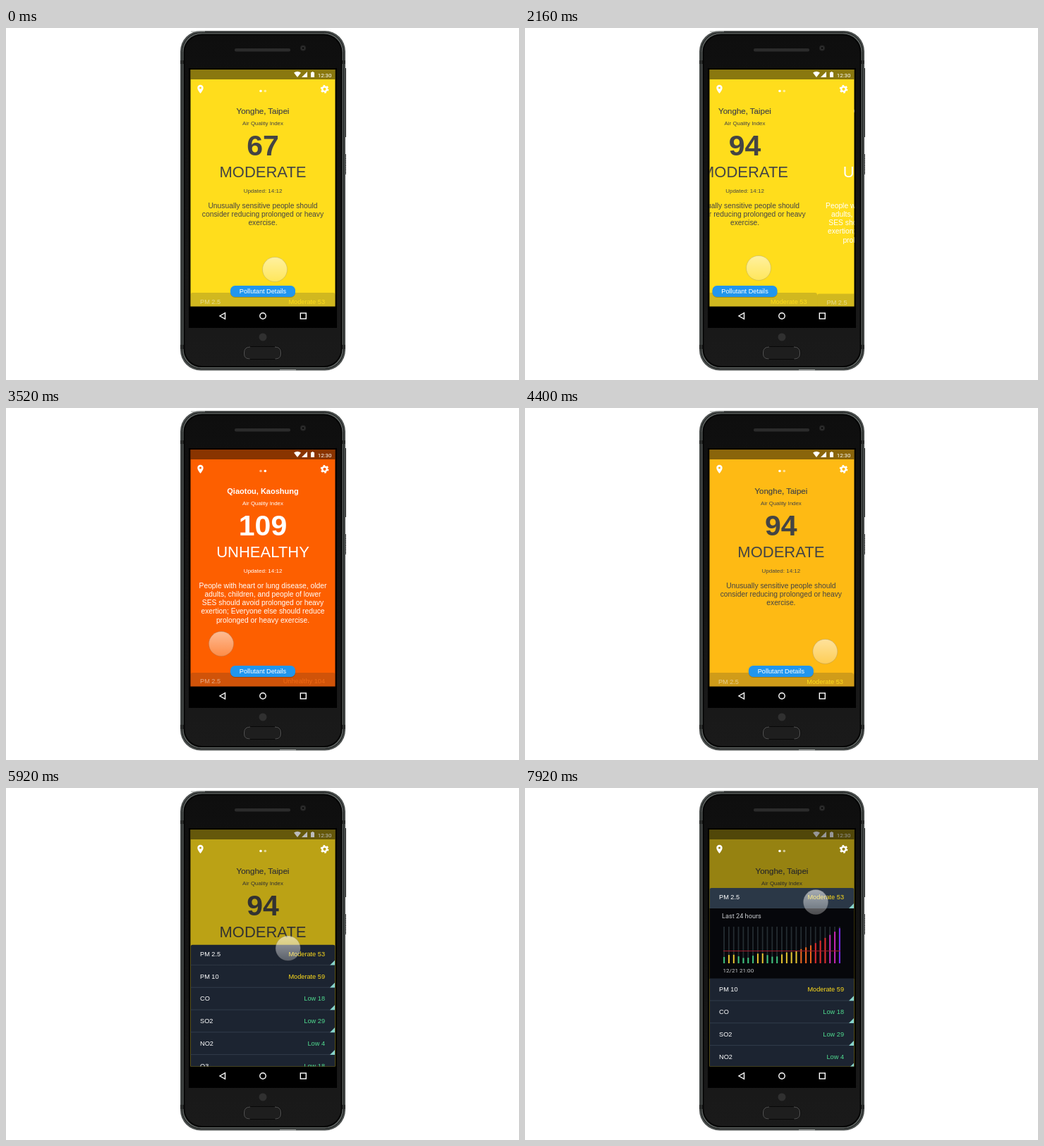
An HTML page for the animation above (8000 ms loop, 727 px wide and 500 px high).

```html
<!DOCTYPE html>
<html lang="en">
<head>
<meta charset="utf-8">
<title>Air quality</title>
<style>
html, body { margin: 0; width: 100%; height: 100%; overflow: hidden; background: #fff; }
svg { display: block; width: 100%; height: 100%; font-family: "Liberation Sans", Arial, sans-serif; }
.roboto { font-family: Roboto, sans-serif; }
.label { font-size: 9.2px; }
</style>
</head>
<body>
<svg viewBox="0 0 727 500">
  <defs>
    <clipPath id="screen"><rect x="261.5" y="59" width="205" height="336.500"/></clipPath>
    <linearGradient id="glass" x2="0" y2="1">
      <stop offset="0" stop-color="#fff" stop-opacity=".58"/>
      <stop offset="1" stop-color="#fff" stop-opacity=".28"/>
    </linearGradient>
    <linearGradient id="face" x2="0" y2="1">
      <stop offset="0" stop-color="#0e0e0e"/>
      <stop offset=".5" stop-color="#151515"/>
      <stop offset="1" stop-color="#1a1a1a"/>
    </linearGradient>
  </defs>

  <g id="phone">
    <path d="M480 57h2v98h-2zM480 179h1.600v29h-1.600z" fill="#333"/>
    <path d="M481.500 180v28" stroke="#111" stroke-dasharray="1 1.500"/>
    <rect x="247" y="4" width="234" height="482.500" rx="29" fill="#4b4f4e"/>
    <rect x="249.500" y="6.500" width="229" height="477.500" rx="27" fill="none" stroke="#161818"/>
    <rect x="251" y="8" width="226" height="474.500" rx="26" fill="none" stroke="#5f6462" stroke-width="1.500"/>
    <path d="M247 46h5v5h-5zM476 46h5v5h-5zM247 450h5v6h-5zM476 450h5v6h-5z" fill="#2a2c2b"/>
    <path d="M262 5h20M388 485.500h23" stroke="#a5a9a7"/>
    <rect x="252.500" y="9.500" width="223" height="471.500" rx="25" fill="url(#face)" stroke="#050505" stroke-width="2"/>
    <rect x="324" y="29" width="79" height="4.500" rx="2" fill="#2b2b2b"/>
    <circle cx="421" cy="28.500" r="4" fill="#252525"/>
    <circle cx="421" cy="28.500" r="2" fill="#0a0a0a" stroke="#444" stroke-width=".7"/>
    <rect x="259" y="57" width="210" height="369" fill="#000"/>
    <circle cx="364" cy="439" r="5.500" fill="#303030"/>
    <rect x="337" y="452.500" width="53.500" height="18" rx="8" fill="#1e1e1e" stroke="#080808"/>
    <path d="M346 453q-8.500 0-8.500 8v2q0 7 8 7M381 453q8.500 0 8.500 8v2q0 7-8 7" fill="none" stroke="#555"/>
    <g fill="none" stroke="#fff" stroke-width="1.400">
      <path d="M303 409l7.500-4.300v8.600z"/>
      <circle cx="364" cy="409" r="4.200"/>
      <rect x="417.300" y="405" width="8" height="8"/>
    </g>
  </g>

  <g clip-path="url(#screen)">
    <rect id="bg" x="261" y="59" width="206" height="337"/>
    <rect x="261" y="59" width="206" height="14" opacity=".46"/>
    <g fill="#fff">
      <path d="M408 63.500q5-3.500 10 0l-5 6.500zM419 70l8-8v8zM432 63h1.500v-1h2v1h1.500v7h-5z"/>
      <text class="roboto" x="441.700" y="69.500" font-size="8">12:30</text>
    </g>
    <g id="pages">
      <g id="pageA" fill="#444"></g>
      <g id="pageB" fill="#fff" transform="translate(205)"></g>
    </g>
    <rect id="dim" x="261" y="59" width="206" height="337"/>
    <g fill="#fff">
      <path fill-rule="evenodd" d="M275.500 93q-4.200-5-4.200-8a4.200 4.200 0 0 1 8.400 0q0 3-4.200 8zM275.500 86.500a1.500 1.500 0 1 0 0-3 1.500 1.500 0 0 0 0 3z"/>
      <g fill="none" stroke="#fff" transform="translate(451.500 86.800)">
        <circle r="3.300" stroke-width="2.400"/>
        <circle r="5" stroke-width="1.800" stroke-dasharray="2.618"/>
      </g>
      <circle id="dotA" cx="361" cy="89.500" r="1.800"/>
      <circle id="dotB" cx="367.300" cy="89.500" r="1.800"/>
    </g>
    <g id="panelLayer">
      <g id="panelB" transform="translate(205 376)">
        <rect x="261.500" width="205" height="30" rx="3" fill="#1c2431" opacity=".2"/>
        <text class="label" x="275" y="15.300" fill="#fff" opacity=".5">PM 2.5</text>
        <text class="label" x="452" y="15.300" text-anchor="end" fill="#f87018" opacity=".8">Unhealthy 104</text>
      </g>
      <g id="panelA">
        <path class="sheet" id="head" d="M261.500 29V3q0-3 3-3h199q3 0 3 3v26z"/>
        <g id="firstRow"></g>
        <g id="chart">
          <rect x="261" y="29" width="206" height="100" fill="#06070b"/>
          <g class="roboto" fill="#c9cbce">
            <text x="279" y="43.300" font-size="9.200">Last 24 hours</text>
            <text x="280.500" y="120" font-size="8.100">12/21 21:00</text>
          </g>
          <g id="bars"></g>
          <path d="M281 89.500h166" stroke="#a01c2c"/>
        </g>
        <g id="rest"><rect class="sheet" x="261.500" y="29" width="205" height="250" fill="#1c2431"/></g>
      </g>
      <g id="buttonB" transform="translate(569 374)"></g>
      <g id="buttonA"></g>
    </g>
  </g>
  <circle id="touch" r="17.500" fill="url(#glass)" stroke="#777" stroke-opacity=".35" stroke-width=".8"/>
</svg>

<script>
const LOOP = 8000, STEP = 80, PAGE = 205, PULL = 234, CHART = 99.5;
const $ = id => document.getElementById(id);
const set = (id, name, value) => $(id).setAttribute(name, value);
const add = (id, markup) => $(id).insertAdjacentHTML("beforeend", markup);
const clamp = x => Math.max(0, Math.min(1, x));

// Progress from 0 to 1 between times a and b.
const span = (t, a, b) => clamp((t - a) / (b - a));
const easeOut = (t, a, b) => 1 - (1 - span(t, a, b)) ** 3;
const easeInOut = (t, a, b) => {
  const x = span(t, a, b);
  return x < .5 ? 4 * x ** 3 : 1 - 4 * (1 - x) ** 3;
};

const line = (y, size, text, extra = "") =>
  `<text x="364" y="${y}" font-size="${size}" text-anchor="middle" ${extra}>${text}</text>`;

function page(id, { city, citySize, cityStyle, value, level, advice }) {
  add(id,
    line(121.6, citySize, city, cityStyle) +
    line(138.3, 7.9, "Air Quality Index") +
    line(181, 41, value, `font-weight="bold" id="${id}Value"`) +
    line(211.8, 22, level) +
    line(233.8, 8, "Updated: 14:12") +
    advice.map((s, i) => line(255.8 + i * 12.2, 10.3, s)).join(""));
}

page("pageA", {
  city: "Yonghe, Taipei", citySize: 11.5, cityStyle: 'stroke="#444" stroke-width=".2"',
  value: 67, level: "MODERATE",
  advice: ["Unusually sensitive people should", "consider reducing prolonged or heavy", "exercise."]
});
page("pageB", {
  city: "Qiaotou, Kaoshung", citySize: 11, cityStyle: 'font-weight="bold"',
  value: 109, level: "UNHEALTHY",
  advice: ["People with heart or lung disease, older", "adults, children, and people of lower",
    "SES should avoid prolonged or heavy", "exertion; Everyone else should reduce", "prolonged or heavy exercise."]
});

for (const id of ["buttonA", "buttonB"]) add(id, `
  <rect x="-46" y="-7" width="92" height="16" rx="6.500" opacity=".22"/>
  <rect x="-46" y="-8" width="92" height="16" rx="6.500" fill="#2196ee"/>
  <text class="label" y="3.400" text-anchor="middle" fill="#fff">Pollutant Details</text>`);

const rows = { "PM 2.5": "Moderate 53", "PM 10": "Moderate 59", CO: "Low 18", SO2: "Low 29", NO2: "Low 4", O3: "Low 18" };
Object.entries(rows).forEach(([name, level], i) => {
  const y = 28.7 + i * 31.8;
  const color = level.startsWith("Low") ? "#50dc90" : "#ffdd1c";
  add(i ? "rest" : "firstRow", `
    <path d="M261 ${y}h206" stroke="#313c4b"/>
    <path d="M466 ${y - 6.7}v7h-7z" fill="#86d3cb"/>
    <text class="label" x="275" y="${y - 12.7}" fill="#fff"${i ? "" : ' id="firstName"'}>${name}</text>
    <text class="label" x="452" y="${y - 12.7}" text-anchor="end" fill="${color}">${level}</text>`);
});

// A slow wave for the first hours, then a steady climb.
const barHeight = i => {
  const k = i - 15;
  return k < 0 ? 9 + .3 * i + 3 * Math.cos((i - 1.5) * Math.PI / 3) : 18 + 2 * k + .17 * k * k;
};
const barColor = h =>
  h < 11.8 ? "#3fc47e" : h < 20 ? "#e6c42f" : h < 27 ? "#f0641e" : h < 38 ? "#e02a2c" : h < 47 ? "#c728b4" : "#7a2be8";
for (let i = 0; i < 25; i++) {
  const x = 281.2 + i * 6.82, h = barHeight(i);
  add("bars", `<rect x="${x}" y="55" width="1.800" height="52" fill="#242c31"/>
    <rect x="${x}" y="${107 - h}" width="2" height="${h}" fill="${barColor(h)}"/>`);
}

const yellow = [255, 221, 28], orange = [253, 95, 0];

function draw(t) {
  const next = easeInOut(t, 1920, 2520), back = easeInOut(t, 3600, 4500);
  const x = PAGE * (back - next);
  const heat = easeOut(t, 2160, 3520) - easeOut(t, 3840, 5440);
  const open = easeInOut(t, 5440, 6300), up = PULL * open;
  const grow = easeOut(t, 7440, 7920);

  const aim = easeInOut(t, 4480, 5280), leave = easeInOut(t, 6240, 6480);
  const fx = 381 - 76 * easeOut(t, 1920, 2720) + 121 * back - 29 * aim
    + 4 * open + 28 * leave - 17 * easeOut(t, 6560, 7040);
  const fy = 343 - 8 * next + 11 * back + 27 * aim
    - 222 * open + 113 * leave - 102 * easeOut(t, 6560, 7344);

  $("pageAValue").textContent = Math.round(67 + 27 * span(t, 80, 1760));
  set("bg", "fill", `rgb(${yellow.map((v, i) => Math.round(v + (orange[i] - v) * heat))})`);
  set("pages", "transform", `translate(${x})`);
  set("panelLayer", "transform", `translate(${x})`);
  set("panelB", "transform", `translate(${PAGE} ${378 - 2 * next})`);
  set("dotA", "opacity", x < -PAGE / 2 ? .55 : 1);
  set("dotB", "opacity", x < -PAGE / 2 ? 1 : .55);

  set("dim", "opacity", .41 * open);
  set("panelA", "transform", `translate(0 ${376 - up})`);
  for (const el of document.querySelectorAll(".sheet")) el.setAttribute("opacity", clamp(.2 + 1.3 * open));
  set("firstName", "opacity", clamp(.5 + 14 * open));
  const size = Math.max(0, 1 - 2 * open);
  set("buttonA", "transform", `translate(364 ${374 - up}) scale(${size})`);
  set("buttonA", "opacity", size);

  set("head", "fill", grow > 0 ? "#2b3847" : "#1c2431");
  set("chart", "display", grow > 0 ? "inline" : "none");
  set("rest", "transform", `translate(0 ${CHART * grow})`);
  set("touch", "transform", `translate(${fx} ${fy})`);
}

const start = performance.now();
function tick() {
  const t = (performance.now() - start) % LOOP;
  draw(Math.floor(t / STEP) * STEP);
  requestAnimationFrame(tick);
}
tick();
</script>
</body>
</html>
```
